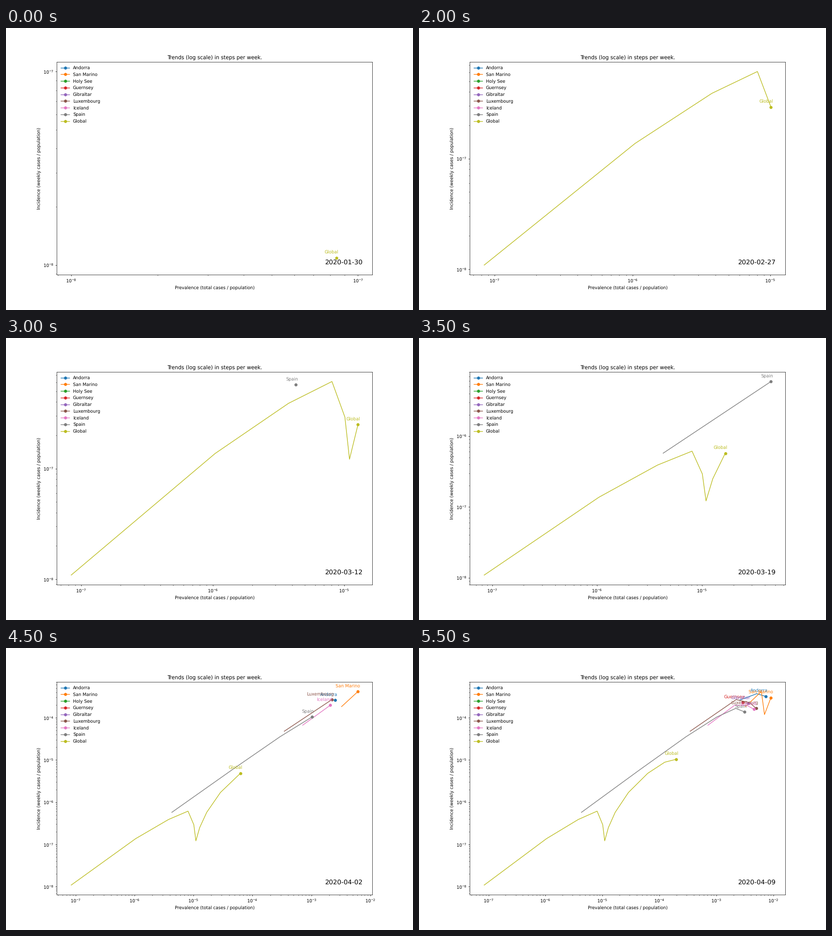
A matplotlib script that plays this animation: 899x623 px, repeating every 10 s.

```python
import matplotlib.pyplot as plt
import numpy as np
from matplotlib.animation import FuncAnimation
from matplotlib.ticker import NullFormatter

W, H, DPI = 899, 623, 69.2
FRAMES, INTERVAL = 20, 500
LAST_STEP = 11
LAST_DATE_STEP = 10
MARGIN = 0.05
START = np.datetime64("2020-01-30")

# name: (first step, cases per million; the leading value precedes that step)
CASES = {
    "Andorra": (9, [720, 2530, 5120, 7355]),
    "San Marino": (8, [1965, 3245, 6160, 6990, 9080]),
    "Holy See": (0, []),
    "Guernsey": (11, [1290, 2894]),
    "Gibraltar": (11, [2060, 3600]),
    "Luxembourg": (8, [12, 346, 2220, 3815, 4980]),
    "Iceland": (8, [245, 710, 2090, 3454, 4565]),
    "Spain": (6, [0.26, 4.276, 45.6, 294, 1022, 2185, 3142]),
    "Global": (0, [0.00775, 0.08405, 1.043, 3.768, 8.06, 10.106, 10.957,
                   12.705, 16.72, 28.6, 62.3, 124.2, 196.6]),
}


class Series:
    def __init__(self, ax, name, first, cases):
        total = np.array(cases, float) * 1e-6
        self.first = first
        self.x = total[1:]
        self.y = np.diff(total) / 7
        self.line, = ax.plot([], [], "o-", label=name, markevery=[-1])
        self.label = ax.annotate(name, (1, 1), xytext=(5, 10), ha="right",
                                 textcoords="offset points",
                                 color=self.line.get_color())

    def show(self, step):
        n = min(max(step - self.first + 1, 0), len(self.x))
        x, y = self.x[:n], self.y[:n]
        self.line.set_data(x, y)
        for artist in (self.line, self.label):
            artist.set_visible(n > 0)
        if n:
            self.label.xy = x[-1], y[-1]
        return x, y


def log_limits(values):
    lo, hi = np.log10([values.min(), values.max()])
    if lo == hi:
        lo, hi = np.floor(lo), np.ceil(hi)
    pad = MARGIN * (hi - lo)
    return 10 ** (lo - pad), 10 ** (hi + pad)


plt.rcParams["font.family"] = "DejaVu Sans"
plt.rcParams["text.hinting"] = "no_hinting"
fig = plt.figure(figsize=((W + 1e-6) / DPI, (H + 1e-6) / DPI), dpi=DPI,
                 facecolor="white")
fig.subplots_adjust(left=0.125, right=0.9, bottom=0.125, top=0.88)
ax = fig.add_subplot()
ax.set_xscale("log")
ax.set_yscale("log")
for axis in (ax.xaxis, ax.yaxis):
    axis.set_minor_formatter(NullFormatter())
ax.set_title("Trends (log scale) in steps per week.")
ax.set_xlabel("Prevalence (total cases / population)")
ax.set_ylabel("Incidence (weekly cases / population)")

series = [Series(ax, name, *data) for name, data in CASES.items()]
ax.legend(loc="upper left", frameon=False, labelspacing=0.53)
date = ax.text(0.85, 0.05, "", transform=ax.transAxes, fontsize=15)


def update(frame):
    step = min(frame, LAST_STEP)
    xs, ys = zip(*(s.show(step) for s in series))
    ax.set_xlim(log_limits(np.concatenate(xs)))
    ax.set_ylim(log_limits(np.concatenate(ys)))
    date.set_text(str(START + 7 * min(step, LAST_DATE_STEP)))
    return [date]


anim = FuncAnimation(fig, update, frames=FRAMES, interval=INTERVAL,
                     repeat=True, repeat_delay=0, blit=False)
plt.show()
```
